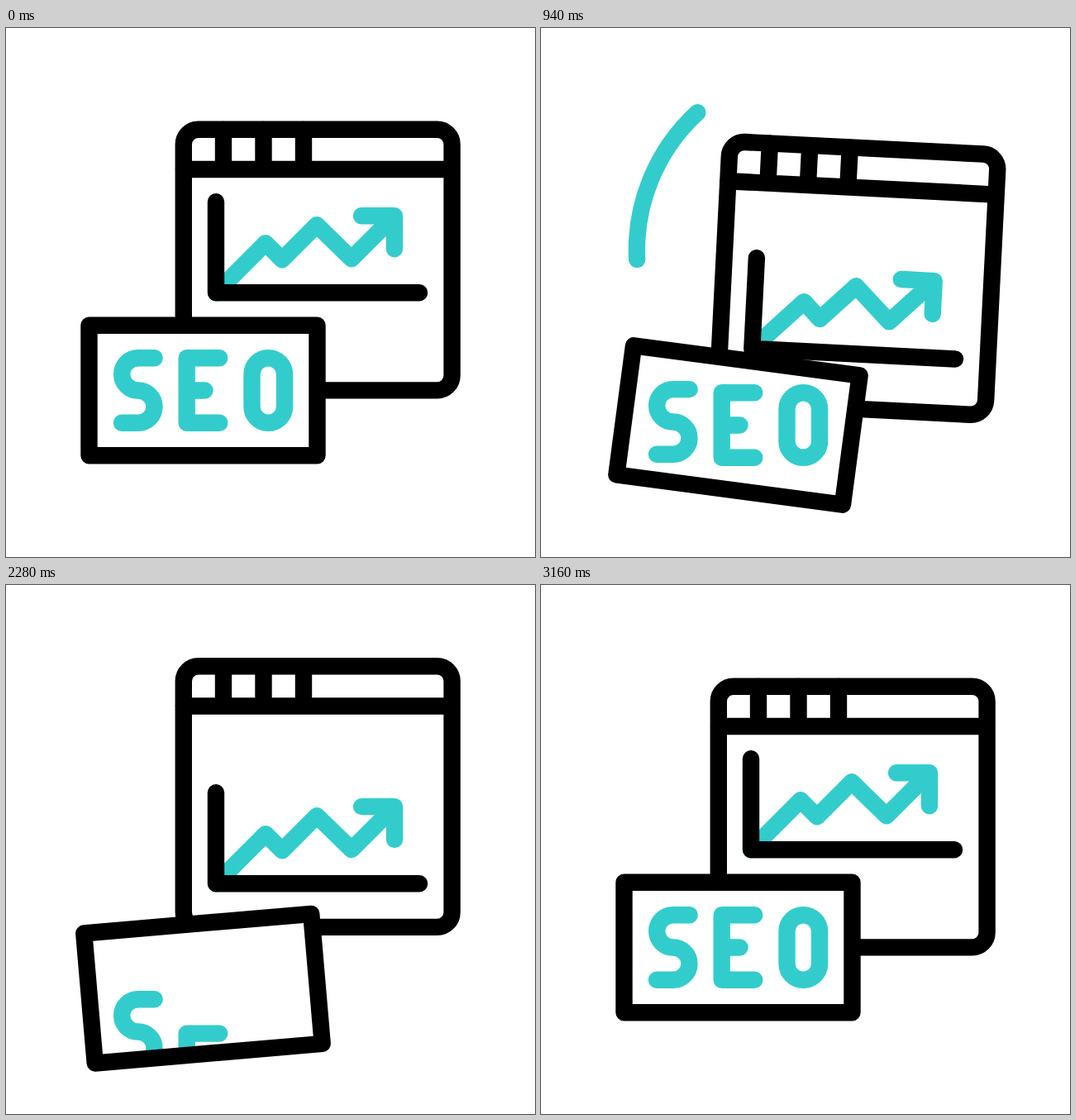
An HTML page that plays this animation: 640 by 640 pixels, repeating every 3.3 s.

```html
<!DOCTYPE html>
<html lang="en">
<head>
<meta charset="utf-8">
<title>Search report</title>
<style>
  html, body { margin: 0; width: 100%; height: 100%; overflow: hidden; background: #fff; }
  svg { display: block; width: 100vw; height: 100vh; }
  .ink, .teal { fill: none; stroke: #000; stroke-width: 20.4; stroke-linecap: round; stroke-linejoin: round; }
  .teal { stroke: #33cccc; }
  .paper { fill: #fff; }
</style>
</head>
<body>
<svg viewBox="0 0 640 640">
  <defs>
    <rect id="sheet" x="100.5" y="359.7" width="276" height="157.6"/>
    <clipPath id="inside"><use id="mask" href="#sheet"/></clipPath>
  </defs>
  <path id="swooshUp" class="teal"/>
  <path id="swooshDown" class="teal" transform="translate(723 -10) scale(-1 1)"/>
  <g id="win">
    <rect class="ink paper" x="214.8" y="122.8" width="324.8" height="315.6" rx="18"/>
    <path class="ink" d="M215 171H539M263 123V171M311.5 123V171M360 123V171"/>
    <g id="chart">
      <path id="trend" class="teal"/>
      <path id="axes" class="ink"/>
    </g>
  </g>
  <use id="fill" class="paper" href="#sheet"/>
  <g clip-path="url(#inside)">
    <path id="S" class="teal" d="M179.7 399.2H159.8a19.6 19.6 0 0 0 0 39.3a19.6 19.6 0 0 1 0 39.3H140"/>
    <path id="E" class="teal" d="M258.3 399.2H218.7V477.8H258.3M218.7 438.5H240.5"/>
    <rect id="O" class="teal" x="297.5" y="399.2" width="39.6" height="78.6" rx="19.8"/>
  </g>
  <use id="board" class="ink" href="#sheet"/>
</svg>
<script>
const LOOP = 3300;
const el = id => document.getElementById(id);
const place = (id, value) => el(id).setAttribute('transform', value);
const mix = (a, b, k) => a + (b - a) * k;

// Eased progress from 0 to 1 between two times.
function ramp(t, from, to) {
  const u = Math.min(1, Math.max(0, (t - from) / (to - from)));
  return u * u * (3 - 2 * u);
}

// Swing one way, then the other, settle, and finally return to zero.
function sway(t, first, second, settled) {
  const out = first * ramp(t, 200, 480)
    + (second - first) * ramp(t, 480, 890)
    + (settled - second) * ramp(t, 890, 1340);
  return out - settled * back(t);
}
const back = t => ramp(t, 2660, 2968);

// Chart geometry, measured right and up from the corner of the axes.
const X0 = 254, Y0 = 320.3, BARB = 40;
const calm = [[60, 60], [80, 40], [122, 82], [164, 41], [216, 93]];
const tall = [[73, 83], [107, 51], [143, 106], [179, 77], [233, 133]];

function drawChart(t) {
  const dip = ramp(t, 960, 1330) - ramp(t, 1330, 1840);
  const grow = ramp(t, 1330, 1840) - ramp(t, 1840, 2300);
  const height = 110 - 20.5 * dip + 39 * grow;
  const length = 246 - 43.5 * dip + 8 * grow;
  el('axes').setAttribute('d', `M${X0} ${Y0 - height}V${Y0}h${length}`);

  const points = calm.map(([x, y], i) => [
    X0 + mix(x, tall[i][0], grow) - 0.11 * dip * x,
    Y0 - mix(y, tall[i][1], grow) + 0.08 * dip * y
  ]);
  const [x, y] = points.at(-1);
  el('trend').setAttribute('d',
    `M${X0} ${Y0}L${points.join(' ')}M${x - BARB} ${y}H${x}V${y + BARB}`);
}

function drawLetters(t, y) {
  [...'SEO'].forEach((id, i) => {
    const leave = 880 + 130 * Math.sqrt(i), enter = 1930 + 120 * i;
    const shift = t < 1800 ? -ramp(t, leave, leave + 600) : 1 - ramp(t, enter, enter + 600);
    place(id, `translate(0 ${y + 140 * shift})`);
  });
}

function swoosh(id, from, to) {
  const at = k => {
    const a = mix(-2.8, 74.9, k) * Math.PI / 180;
    return `${341.9 - 226 * Math.cos(a)} ${269 - 226 * Math.sin(a)}`;
  };
  el(id).setAttribute('d', to - from > 0.001 ? `M${at(from)}A226 226 0 0 1 ${at(to)}` : '');
}

function draw(t) {
  const turn = sway(t, -4, 3, 0);
  place('win', `translate(${2 * turn} ${sway(t, -42, 24, -24.5)}) rotate(${turn} 377.2 280.6)`);
  place('chart', `translate(0 ${65.5 * (ramp(t, 560, 1100) - back(t))})`);
  drawChart(t);

  const y = sway(t, -57.5, 41.7, 49.7);
  const pose = `translate(0 ${y}) rotate(${sway(t, -8.6, 8, -4.9)} 238.5 438.5)`;
  for (const id of ['fill', 'mask', 'board']) place(id, pose);
  drawLetters(t, y);

  swoosh('swooshUp', ramp(t, 1040, 1406), ramp(t, 761, 1061));
  swoosh('swooshDown', 1 - ramp(t, 2890, 3060), 1 - ramp(t, 2980, 3160));
}

const start = performance.now();
function frame() {
  draw((performance.now() - start) % LOOP);
  requestAnimationFrame(frame);
}
frame();
</script>
</body>
</html>
```
